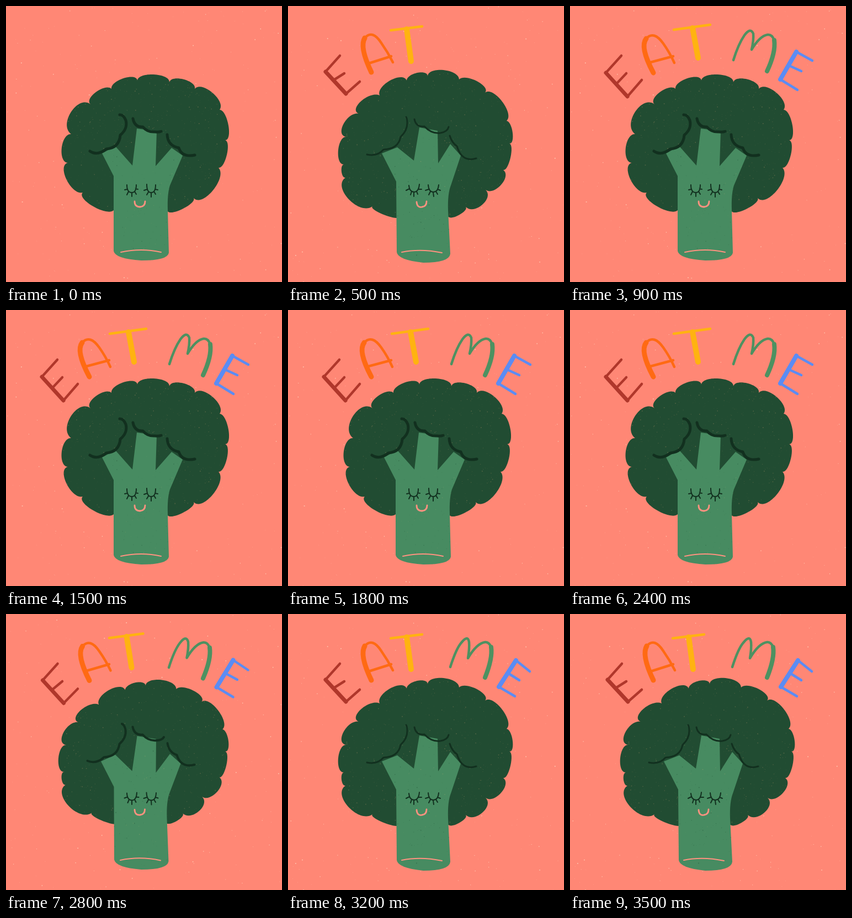
Write an HTML page with a canvas that moves like this. It is 500 px wide and 500 px high and loops after 3.6 s.

```html
<!DOCTYPE html>
<html lang="en">
<head>
<meta charset="utf-8">
<title>Eat me</title>
<style>
html, body { margin: 0; width: 100%; height: 100%; overflow: hidden; background: #ff8775; }
canvas { display: block; }
</style>
</head>
<body>
<canvas id="stage" width="500" height="500" role="img" aria-label="Eat me: a sleeping broccoli"></canvas>
<script>
const ctx = document.getElementById('stage').getContext('2d');
const FRAME = 100, LOOP = 3600;
const PINK = '#ff8775', LEAF = '#214c32', STEM = '#478b61', INK = '#12301f', BLUSH = '#ff9280';
const LETTERS = [['#b0372b', 7], ['#ff6a13', 9], ['#ffb310', 10], ['#4d9161', 8], ['#5b8cf4', 8]];

// crown: valley, peak, valley, peak ... clockwise; words: [thick, thin] strokes per letter
const open = {
  crown: [195,370, 158,363, 139,338, 110,315, 112,284, 101,257, 118,232, 118,192, 153,178, 163,156,
    191,150, 213,131, 238,135, 268,124, 296,138, 322,133, 342,150, 374,157, 387,188, 403,216,
    397,243, 400,270, 385,293, 375,334, 340,348, 321,367, 293,372],
  stem: 'M174 267L198 254L229 289L237 222L273 227L271 290L300 257L320 271L297 325Q292 340 293 370L295 447Q293 461 245 461Q198 458 195 444L195 308Z',
  folds: 'M152 263Q165 272 182 259Q205 257 207 234Q221 222 217 207Q213 197 206 197M230 204Q233 220 248 219Q256 229 270 228Q277 229 281 227M292 233Q293 253 313 257Q319 275 342 270',
  foldWidth: 5,
  eyes: 'M219 324Q219 338 228 338Q236 338 236 324M215 333L220 332M222 336L219 342M228 338L228 345M233 336L236 341M235 331L239 332M255 323Q255 338 263 338Q271 338 271 324M250 334L256 332M258 337L255 342M263 338L263 346M268 336L271 341M270 332L275 333',
  smile: 'M233 354Q233 364 243 364Q252 363 252 354',
  base: 'M208 446Q245 438 281 446',
  words: [
    ['M65 121L104 164', 'M65 121L93 90M86 139L102 122M104 164L130 134'],
    ['M151 121Q126 74 138 59', 'M138 59Q152 44 169 68Q181 85 189 103M142 103L187 91'],
    ['M222 40L232 94', 'M188 43L254 34'],
    ['M370 62Q373 84 357 118', 'M296 98Q305 69 316 53Q327 38 332 50Q333 62 329 79Q344 54 358 52Q366 51 370 62'],
    ['M410 83L381 133', 'M410 83L439 99M397 108L419 118M381 133L412 152']
  ]
};
const wide = {
  crown: [200,383, 171,377, 153,363, 110,350, 104,311, 97,300, 101,287, 91,262, 105,237, 101,213,
    128,195, 133,172, 166,162, 185,135, 215,135, 235,121, 253,128, 281,116, 310,133, 342,136,
    357,157, 388,173, 396,208, 407,230, 401,249, 403,275, 390,297, 386,324, 358,333, 352,360,
    322,364, 311,378, 291,382],
  stem: 'M170 267L198 256L228 280L238 220L271 226L272 285L294 250L313 271L295 325Q289 340 290 370L294 449Q292 465 245 465Q199 460 197 446L196 318Z',
  folds: 'M143 269Q162 273 173 260Q200 259 204 237Q216 226 216 212Q216 204 214 201M229 205Q232 220 247 218Q260 232 276 230Q289 228 291 219M293 235Q297 248 306 254Q315 284 341 276',
  foldWidth: 3,
  eyes: 'M219 325Q220 337 229 337Q237 336 238 323M214 334L220 331M224 336L222 342M228 337L228 345M233 336L235 341M236 332L242 332M254 324Q255 337 263 337Q272 337 273 324M249 334L255 332M258 336L255 342M263 338L264 345M268 336L271 341M271 332L276 334',
  smile: 'M233 355Q234 366 243 364Q251 363 251 354',
  base: 'M206 446Q240 439 279 447',
  words: [
    ['M68 119L105 159', 'M68 119L94 90M83 134L102 122M105 159L130 137'],
    ['M151 120Q129 74 139 58', 'M139 58Q153 42 169 67Q181 84 190 102M146 104L187 91'],
    ['M215 42L223 100', 'M186 44L243 37'],
    ['M368 60Q371 80 357 115', 'M294 96Q305 62 314 52Q326 37 328 51Q329 62 326 80Q342 53 357 51Q364 50 368 60'],
    ['M413 84L382 132', 'M413 84L438 104M400 108L419 120M382 132L411 149']
  ]
};

const blend = (a, b) => {
  const other = b.match(/\d+/g);
  let i = 0;
  return a.replace(/\d+/g, n => (+n + +other[i++]) / 2);
};

const middle = { foldWidth: 4, crown: wide.crown.map(v => 249 + (v - 249) * .975) };
for (const key of ['stem', 'folds', 'eyes', 'smile', 'base']) middle[key] = blend(open[key], wide[key]);
middle.words = open.words.map((word, i) => word.map((path, j) => blend(path, wide.words[i][j])));

const poses = [open, middle, wide];

function scallops(p) {
  const path = new Path2D();
  path.moveTo(p[0], p[1]);
  for (let i = 0; i + 5 < p.length; i += 4) {
    const [x0, y0, px, py, x1, y1] = p.slice(i, i + 6);
    const dx = (px - (x0 + x1) / 2) * 4 / 3, dy = (py - (y0 + y1) / 2) * 4 / 3;
    path.bezierCurveTo(x0 + dx, y0 + dy, x1 + dx, y1 + dy, x1, y1);
  }
  path.closePath();
  return path;
}

function random(seed) {
  return () => (seed = seed * 16807 % 2147483647) / 2147483647;
}

function specks(count, color, seed, clip) {
  const rnd = random(seed);
  ctx.save();
  if (clip) ctx.clip(clip);
  ctx.fillStyle = color;
  for (let i = 0; i < count; i++) {
    const size = .5 + rnd() ** 4 * 1.2;
    ctx.fillRect(rnd() * 500, rnd() * 500, size, size);
  }
  ctx.restore();
}

function stroke(path, color, width) {
  ctx.strokeStyle = color;
  ctx.lineWidth = width;
  ctx.stroke(new Path2D(path));
}

function draw(now) {
  const frame = Math.floor(now % LOOP / FRAME);
  const index = frame % 3, pose = poses[index], seed = 4321 + index * 7919;
  const crown = scallops(pose.crown), stem = new Path2D(pose.stem);

  ctx.fillStyle = PINK;
  ctx.fillRect(0, 0, 500, 500);
  specks(260, '#ffc9b3', seed);

  ctx.lineCap = ctx.lineJoin = 'round';
  ctx.fillStyle = LEAF;
  ctx.fill(crown);
  specks(2600, 'rgba(132,126,88,.5)', seed + 1, crown);

  ctx.fillStyle = STEM;
  ctx.fill(stem);
  specks(900, 'rgba(34,82,54,.4)', seed + 2, stem);
  specks(600, 'rgba(140,160,110,.4)', seed + 3, stem);

  stroke(pose.folds, INK, pose.foldWidth);
  stroke(pose.eyes, INK, 2);
  stroke(pose.smile, BLUSH, 2.8);
  stroke(pose.base, BLUSH, 2);

  // one more letter every second frame
  const shown = Math.ceil(frame / 2);
  LETTERS.slice(0, shown).forEach(([color, width], i) => {
    stroke(pose.words[i][0], color, width);
    stroke(pose.words[i][1], color, 4.5);
  });
  requestAnimationFrame(draw);
}
requestAnimationFrame(draw);
</script>
</body>
</html>
```
